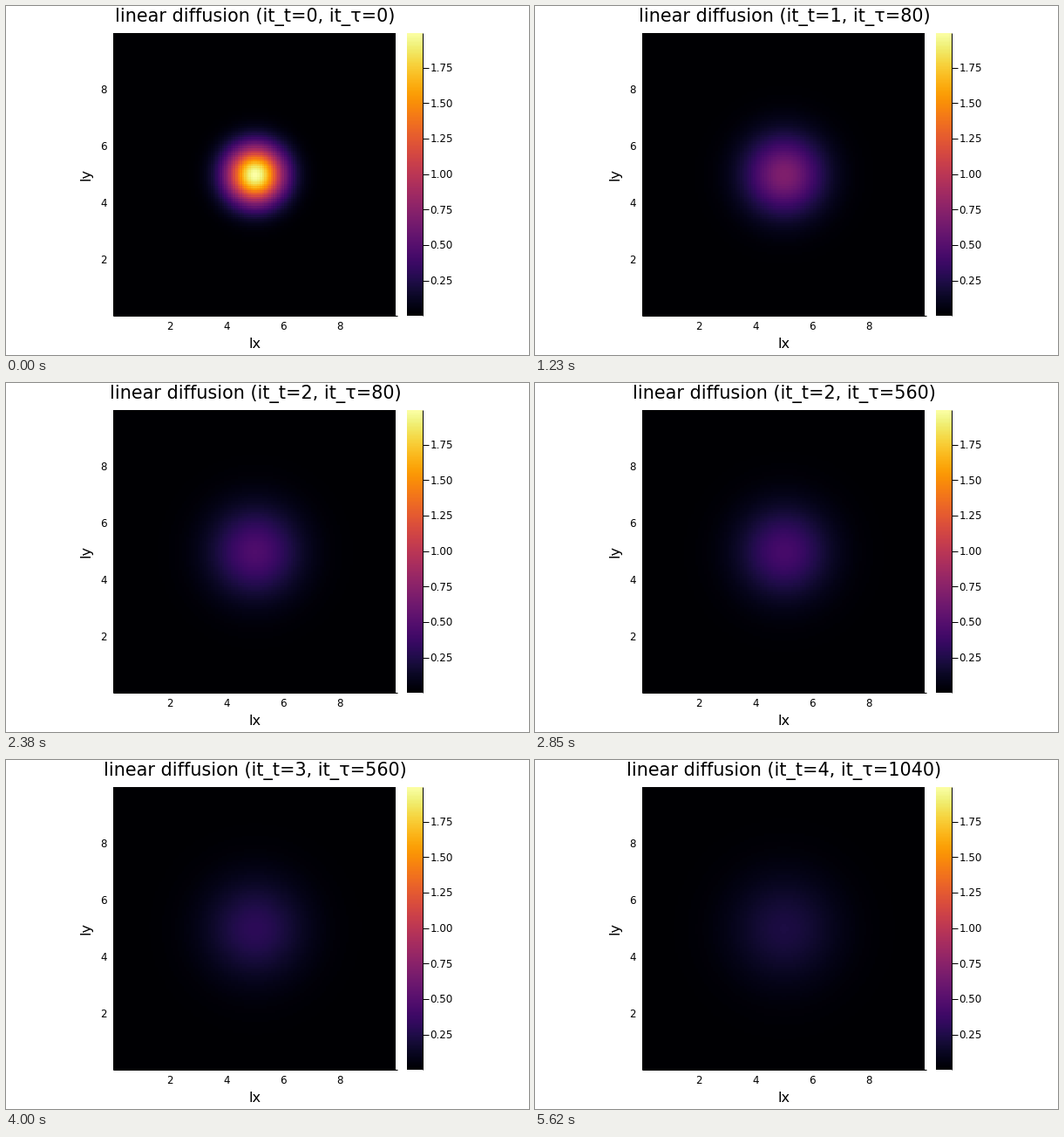
A matplotlib script for the animation above (5.7 s loop, 600x400 px).

```python
import numpy as np
import matplotlib.pyplot as plt
from matplotlib.animation import FuncAnimation
from matplotlib.patches import Rectangle

W, H, DPI = 600, 400, 100
LOOP_MS, TICK_MS = 5700, 20
FPS, LAST_STATE = 13, 73

# Physics: implicit steps of a 3D blob, each relaxed in pseudo-time
L, N = 10.0, 128
DT = 0.2
TAU_PER_STATE = 0.2
STATES_PER_STEP, ITERS_PER_STATE = 15, 80

# Plot geometry in pixels
X0, X1, Y0, Y1 = 123.1, 448.8, 356.0, 30.9
BAR_TOP, BAR_BOTTOM = 31, 355.5

plt.rcParams["font.family"] = "DejaVu Sans"

dx = L / N
xc = (np.arange(N) + 0.5) * dx - L / 2
dist = np.hypot(*np.meshgrid(xc, xc))
peak = 2 * np.exp(-dist.min() ** 2)

# Radial spectrum of the blob 2*exp(-r^2), wave number k = 2s
s = np.linspace(0.01, 5, 400)
k2 = 4 * s**2
radii = np.linspace(0, L, 300)
modes = np.sinc(2 * np.outer(radii, s) / np.pi)
weights = 8 / np.sqrt(np.pi) * s**2 * np.exp(-s**2) * (s[1] - s[0])
gain = 1 / (1 + DT * k2)


def counters(state):
    """Time step and number of relaxation rounds of a state."""
    if state == 0:
        return 0, 0
    step, rounds = divmod(state - 1, STATES_PER_STEP)
    return step, rounds + 1


def field(step, rounds):
    left = np.exp(-(1 / DT + k2) * TAU_PER_STATE * rounds)
    profile = modes @ (weights * gain**step * (gain + (1 - gain) * left))
    return np.interp(dist, radii, profile)


def px(size):
    return size * 72 / DPI


def label(x, y, text, size, ha="center", **kw):
    return ax.text(x, y, text, fontsize=px(size), ha=ha, va="baseline",
                   color="black", **kw)


def line(xs, ys):
    ax.plot(xs, ys, color="black", lw=px(1), solid_capstyle="butt")


fig = plt.figure(figsize=(W / DPI, H / DPI), dpi=DPI, facecolor="white")
ax = fig.add_axes([0, 0, 1, 1])
ax.axis("off")

heat = ax.imshow(field(0, 0), cmap="inferno", vmin=0, vmax=peak,
                 origin="lower", extent=(X0, X1, Y0, Y1),
                 interpolation="nearest", aspect="auto")
ax.imshow(np.linspace(0, 1, 256)[:, None], cmap="inferno", origin="lower",
          extent=(460, 478, 355, BAR_TOP), interpolation="nearest",
          aspect="auto")
ax.set_xlim(0, W)
ax.set_ylim(H, 0)
ax.set_autoscale_on(False)
heat.set_clip_path(Rectangle((123, 31), 324, 324, transform=ax.transData))

# Axes
line([123, 449], [355, 355])
line([123, 123], [31, 355])
for v in (2, 4, 6, 8):
    label(X0 + v * (X1 - X0) / L - 0.3, 371, str(v), 11.9)
    label(111.8, Y0 + v * (Y1 - Y0) / L + 4.5, str(v), 11.9)
label(286, 392, "lx", 16.3)
label(96.5, 192.8, "ly", 16.3, rotation=90, rotation_mode="anchor")

# Colour bar scale
line([478, 478], [31, 355])
for i in range(1, 8):
    v = i / 4
    y = BAR_BOTTOM - v / peak * (BAR_BOTTOM - BAR_TOP)
    line([478, 484.5], [y, y])
    label(486.5, y + 4.3, f"{v:.2f}", 11.9, ha="left")

title = label(286, 18, "", 20.8)


def update(frame):
    now = (frame + 0.5) * TICK_MS
    state = min(int((now + 5) * FPS / 1000), LAST_STATE)
    step, rounds = counters(state)
    heat.set_data(field(step, rounds))
    title.set_text(f"linear diffusion (it_t={step}, "
                   f"it_τ={rounds * ITERS_PER_STATE})")
    return heat, title


anim = FuncAnimation(fig, update, frames=LOOP_MS // TICK_MS,
                     interval=TICK_MS, repeat=True, repeat_delay=0,
                     blit=False)
plt.show()
```
